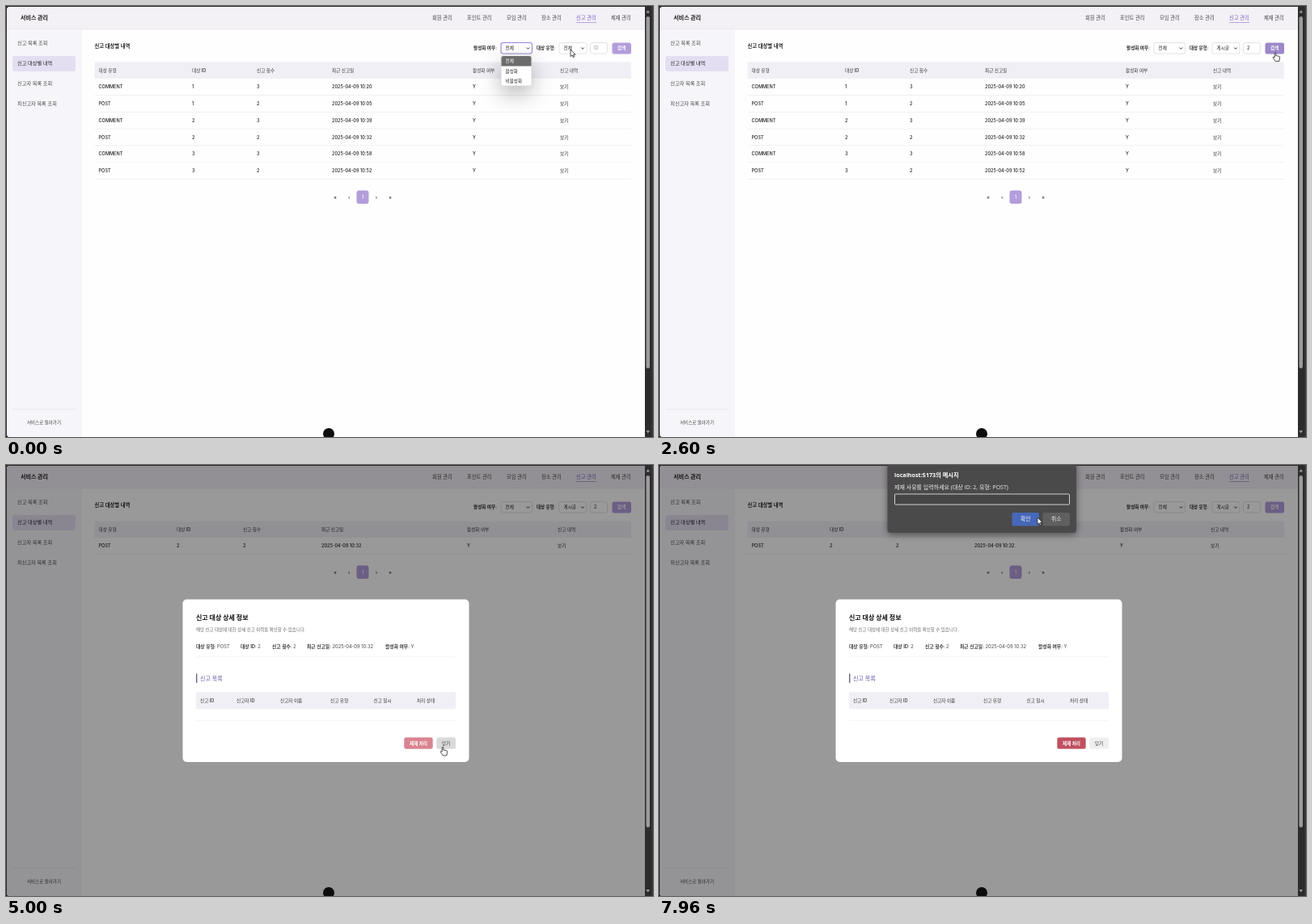
Write an HTML page with a canvas that moves like this. It is 800 px wide and 534 px high and loops after 8000 ms.

```html
<!DOCTYPE html>
<html lang="ko">
<head>
<meta charset="utf-8">
<style>
  html, body { margin: 0; width: 800px; height: 534px; overflow: hidden; background: #2c2c2c; }
  canvas { display: block; }
</style>
</head>
<body>
<canvas id="stage" width="800" height="534"></canvas>
<script>
const ctx = document.getElementById('stage').getContext('2d');
const LOOP = 8000;
const UI = 'Inter, "Noto Sans CJK KR", "Noto Sans CJK", sans-serif';
const SYSTEM = '"Open Sans", "Noto Sans CJK KR", "Noto Sans CJK", sans-serif';
const INK = '#222', PURPLE = '#b39ddb', LINE = '#e6e3ec';

// Event times in ms
const T = {
  closeFirst: 120, openType: 400, pickType: 1120, focusId: 1500, enterId: 2200,
  results: 2760, modal: 3640, prompt: 6120
};

const between = (t, a, b) => t >= a && t < b;

// y is the middle of the capital letters; returns the x where the text ends
function text(s, x, y, size = 5.6, color = INK, weight = 500, font = UI) {
  ctx.font = `${weight} ${size}px ${font}`;
  ctx.fillStyle = color;
  ctx.fillText(s, x, y + size * 0.36);
  return x + ctx.measureText(s).width;
}

function centered(s, x, ...rest) {
  ctx.textAlign = 'center';
  text(s, x, ...rest);
  ctx.textAlign = 'left';
}

function box(x, y, w, h, fill, radius = 0, stroke, lineWidth = 0.7) {
  ctx.beginPath();
  ctx.roundRect(x, y, w, h, radius);
  if (fill) { ctx.fillStyle = fill; ctx.fill(); }
  if (stroke) { ctx.strokeStyle = stroke; ctx.lineWidth = lineWidth; ctx.stroke(); }
}

function poly(points, stroke, lineWidth, fill) {
  ctx.beginPath();
  points.forEach(([x, y]) => ctx.lineTo(x, y));
  if (fill) { ctx.closePath(); ctx.fillStyle = fill; ctx.fill(); }
  if (stroke) { ctx.strokeStyle = stroke; ctx.lineWidth = lineWidth; ctx.stroke(); }
}

function shadowed(color, blur, offset, draw) {
  ctx.save();
  ctx.shadowColor = color;
  ctx.shadowBlur = blur;
  ctx.shadowOffsetY = offset;
  draw();
  ctx.restore();
}

function frameAndMenus() {
  box(0, 0, 800, 534, '#2c2c2c');
  box(1, 1, 789, 533, '#fefefe', [4, 0, 0, 4]);
  box(1, 1, 789, 28, '#f3f0f6', [4, 0, 0, 0]);
  box(1, 28.5, 789, 0.7, LINE);
  box(1, 29, 93, 505, '#f6f5f9', [0, 0, 0, 4]);

  text('서비스 관리', 18, 14.5, 7, '#1c1c1c', 700);
  const nav = ['회원 관리', '포인트 관리', '모임 관리', '장소 관리', '신고 관리', '제재 관리'];
  [527, 570, 619, 662, 705, 748].forEach((x, i) =>
    text(nav[i], x, 14.5, 6.3, i === 4 ? '#7a5fc0' : '#444'));
  box(705, 20, 25, 0.9, PURPLE);

  box(8, 62, 78, 19, '#e4def2', 3);
  ['신고 목록 조회', '신고 대상별 내역', '신고자 목록 조회', '피신고자 목록 조회'].forEach((s, i) =>
    text(s, 14, 46 + i * 25, 6.2, i === 1 ? INK : '#444'));
  box(8, 499, 78, 0.8, LINE);
  centered('서비스로 돌아가기', 47, 516.5, 5.5, '#444');
}

function select(x, w, label, focused) {
  box(x, 45.5, w, 13.5, '#fff', 2.5, focused ? '#9c84d4' : '#d8d5df', focused ? 1.1 : 0.7);
  text(label, x + 5.5, 52.3);
  const right = x + w - 5;
  poly([[right - 1.7, 51.5], [right, 53.3], [right + 1.7, 51.5]], '#333', 1);
}

function filters(t) {
  text('신고 대상별 내역', 109.5, 50, 6.3, INK, 600);
  text('활성화 여부:', 578, 52.3, 5.6, INK, 600);
  text('대상 유형:', 656, 52.3, 5.5, INK, 600);
  select(612, 38.5, '전체', t < T.closeFirst);
  select(684, 34, t < T.pickType ? '전체' : '게시글', between(t, T.closeFirst, T.focusId));

  const focused = between(t, T.focusId, 2500), filled = t >= T.enterId;
  box(722.5, 45.5, 21, 13.5, '#fff', 2.5, focused ? '#9c84d4' : '#d8d5df', focused ? 1.1 : 0.7);
  text(filled ? '2' : 'ID', 727, 52.3, 5.6, filled ? INK : '#999', 400);
  if (focused && (t - T.focusId) % 1000 < 500) box(filled ? 731.3 : 727, 49, 0.6, 7, INK);

  box(749.5, 45.5, 23.5, 14, between(t, 2300, 2880) ? '#9c88c8' : PURPLE, 2.5);
  centered('검색', 761.2, 52.3, 5.6, '#fff', 600);
}

function table(t) {
  const filtered = t >= T.results;
  const columns = filtered ? [114.5, 211, 293, 390, 570, 682] : [114.5, 230, 310, 403, 577, 685];
  const all = [
    ['COMMENT', 1, 3, 20], ['POST', 1, 2, '05'], ['COMMENT', 2, 3, 39],
    ['POST', 2, 2, 32], ['COMMENT', 3, 3, 58], ['POST', 3, 2, 52]
  ];
  const rows = filtered ? [all[3]] : all;

  box(109.5, 69.5, 663.5, 20.5, '#f1eff6');
  ['대상 유형', '대상 ID', '신고 횟수', '최근 신고일', '활성화 여부', '신고 내역'].forEach((s, i) =>
    text(s, columns[i], 79.7, 5.6, '#333'));
  rows.forEach(([type, id, count, minute], r) => {
    const y = 100.2 + r * 20.8;
    [type, id, count, `2025-04-09 10:${minute}`, 'Y', '보기'].forEach((s, i) => text(s, columns[i], y));
    box(109.5, y + 10, 663.5, 0.7, '#eceaf0');
  });

  const y = filtered ? 132.5 : 236.5;
  box(433.5, y - 8, 15, 16.5, PURPLE, 3);
  ['«', '‹', '1', '›', '»'].forEach((s, i) =>
    centered(s, 407.2 + i * 16.95, y, 6, i === 2 ? '#fff' : '#333'));
}

function dropdown(x, w, items, active) {
  shadowed('rgba(0,0,0,.28)', 26, 10, () => box(x, 61, w, 38, '#fff', 3));
  box(x, 61, w, 38, '#fff', 3, '#cfcfcf', 0.6);
  box(x + 0.5, 62 + active * 12.4, w - 1, 12.4, '#6c6c6c', active ? 0 : [2.5, 2.5, 0, 0]);
  items.forEach((s, i) => text(s, x + 5.5, 68.2 + i * 12.4, 5.6, i === active ? '#fff' : INK));
}

function savedInfo() {
  poly([[722, 60], [727, 55], [732, 60]], null, 0, '#0b0b0d');
  box(630, 59, 163, 83, '#0b0b0d', 4);
  text('저장된 정보', 636.5, 70, 6.7, '#eee', 500, SYSTEM);
  poly([[780.3, 68], [784.3, 72]], '#ddd', 0.8);
  poly([[784.3, 68], [780.3, 72]], '#ddd', 0.8);
  text('2', 636.5, 89, 7.2, '#fff', 700, SYSTEM);
  box(644, 82, 45, 12, '#22386f', 2.5);
  centered('마지막으로 사용', 666.5, 87.8, 5.7, '#a9c1f5', 500, SYSTEM);
  text('2', 636.5, 108, 7.2, '#ddd', 400, SYSTEM);
  box(630, 118.6, 163, 0.8, '#8a8a8a');
  box(639.8, 126.3, 4.4, 4.4, null, 2.2, '#eee', 0.8);
  box(638.3, 131.6, 5, 3.6, null, 1.5, '#eee', 0.8);
  box(642.3, 131.2, 4.4, 3.8, '#eee', 0.7);
  box(643.2, 129.5, 2.6, 3, null, 1.2, '#eee', 0.7);
  text('개인 정보 관리', 650, 130.7, 7.9, '#eee', 500, SYSTEM);
}

function modal(t) {
  box(1, 1, 789, 533, 'rgba(0,0,0,.4)', [4, 0, 0, 4]);
  box(218.5, 166.5, 354, 201.5, '#fff', 5);
  text('신고 대상 상세 정보', 235, 189, 8, '#111', 700);
  text('해당 신고 대상에 대한 상세 신고 이력을 확인할 수 있습니다.', 235, 204, 5.45, '#666', 400);

  const info = [
    [235, '대상 유형:', 'POST'], [290, '대상 ID:', '2'], [329, '신고 횟수:', '2'],
    [372, '최근 신고일:', '2025-04-09 10:32'], [469, '활성화 여부:', 'Y']
  ];
  for (const [x, label, value] of info) {
    text(value, text(label + ' ', x, 225.2, 5.8, '#333', 600), 225.2, 5.8, '#444', 400);
  }
  box(235, 237, 321, 0.6, '#f1f0f4');

  box(235, 258.5, 1.4, 11.5, '#6b6480');
  text('신고 목록', 240, 264.3, 7, '#6a55a8');
  box(235, 281.5, 321, 21, '#f1eff6');
  ['신고 ID', '신고자 ID', '신고자 이름', '신고 유형', '신고 일시', '처리 상태'].forEach((s, i) =>
    text(s, [240, 285, 339, 401, 454.5, 508][i], 292, 5.6, '#333'));
  box(235, 316, 321, 0.6, '#efedf2');

  box(492.3, 337.5, 35.4, 14.3, t >= 5400 ? '#bf5060' : '#d98490', 2.5);
  if (t >= T.prompt) {
    ctx.setLineDash([1, 1]);
    box(492.5, 337.7, 35, 13.9, null, 2.5, '#e3a0aa', 0.6);
    ctx.setLineDash([]);
  }
  centered('제재 처리', 510, 344.6, 5.6, '#fff', 600);
  box(532.3, 337.5, 23.7, 14.3, between(t, 4600, 5280) ? '#dadada' : '#efefef', 2.5);
  centered('닫기', 544.1, 344.6, 5.6, '#333');
}

function prompt(t) {
  shadowed('rgba(0,0,0,.45)', 8, 2, () => box(282.5, -4, 233.5, 88, '#4a4a4a', 4));
  text('localhost:5173의 메시지', 291, 12.3, 7.2, '#fff', 700, SYSTEM);
  text('제재 사유를 입력하세요 (대상 ID: 2, 유형: POST)', 291, 27, 7, '#eee', 400, SYSTEM);
  box(291.5, 36, 216, 13, '#454545', 1, '#d0d0d0', 1);
  if ((t - T.prompt) % 1000 < 500) box(294.5, 38.3, 0.7, 8.4, '#fff');
  box(436.5, 59, 33.5, 16.5, '#4668b8', 2);
  centered('확인', 453.3, 67, 6.8, '#fff', 500, SYSTEM);
  box(474.5, 59, 33.5, 16.5, '#606060', 2);
  centered('취소', 491.2, 67, 6.8, '#eee', 400, SYSTEM);
}

function scrollbar() {
  box(790, 0, 10, 534, '#2c2c2c');
  box(798.3, 0, 1.7, 534, '#3a3a3a');
  box(791.5, 13, 4.5, 436, '#9c9c9c', 2.2);
  poly([[791.5, 8.5], [793.8, 5], [796, 8.5]], null, 0, '#9c9c9c');
  poly([[791.5, 526], [793.8, 529.5], [796, 526]], null, 0, '#9c9c9c');
  ctx.beginPath();
  ctx.arc(399, 530, 7, 0, Math.PI * 2);
  ctx.fillStyle = '#0c0c0c';
  ctx.fill();
}

// Pointer stops: time, x, y
const STOPS = [
  [0, 698, 54], [480, 698, 54], [860, 704.5, 88], [920, 705, 89], [1120, 705, 89],
  [1420, 735, 52], [1540, 735, 52], [1720, 742, 56], [2050, 744, 58], [2400, 762, 57.5],
  [2780, 762, 57.5], [3350, 683, 98], [3860, 683, 98], [4720, 540, 349], [5120, 540, 349],
  [5600, 510, 345], [6240, 510, 345], [6550, 495, 69], [6900, 495, 69], [7500, 468, 65],
  [LOOP, 468, 65]
];
const ARROW = new Path2D('M0 0V8.6L2 6.8 3.4 9.7 4.7 9.1 3.4 6.3H6.1Z');
const HAND = new Path2D('M-.8.8Q0 0 .8.8V4L4.8 4.8Q5.8 5 5.7 6.2L4.8 11H.4L-2.8 6.6Q-2.8 5.3-1.7 5.6L-.8 6.4Z');

function pointerAt(t) {
  const i = STOPS.findIndex(stop => stop[0] > t);
  const [t0, x0, y0] = STOPS[i - 1], [t1, x1, y1] = STOPS[i];
  const u = (t - t0) / (t1 - t0), k = u * u * (3 - 2 * u);
  return [x0 + (x1 - x0) * k, y0 + (y1 - y0) * k];
}

function pointer(t, x, y) {
  const hand = between(t, 2300, 2880) || between(t, 3280, T.modal) || between(t, 4600, 6520);
  const shape = hand ? HAND : ARROW;
  ctx.save();
  ctx.translate(x, y);
  ctx.fillStyle = '#fff';
  ctx.strokeStyle = '#222';
  ctx.lineWidth = 0.8;
  ctx.fill(shape);
  ctx.stroke(shape);
  ctx.restore();
}

function draw(now) {
  const t = now % LOOP, [x, y] = pointerAt(t);
  frameAndMenus();
  filters(t);
  table(t);
  if (t >= T.modal) modal(t);
  scrollbar();
  if (t < T.closeFirst) dropdown(612, 38, ['전체', '활성화', '비활성화'], 0);
  if (between(t, T.openType, T.pickType)) {
    dropdown(684, 34, ['전체', '댓글', '게시글'], Math.max(0, Math.min(2, Math.floor((y - 62) / 12.4))));
  }
  if (between(t, T.focusId, T.enterId)) savedInfo();
  if (t >= T.prompt) prompt(t);
  pointer(t, x, y);
}

const start = performance.now();
(function tick() {
  draw(performance.now() - start);
  requestAnimationFrame(tick);
})();
</script>
</body>
</html>
```
